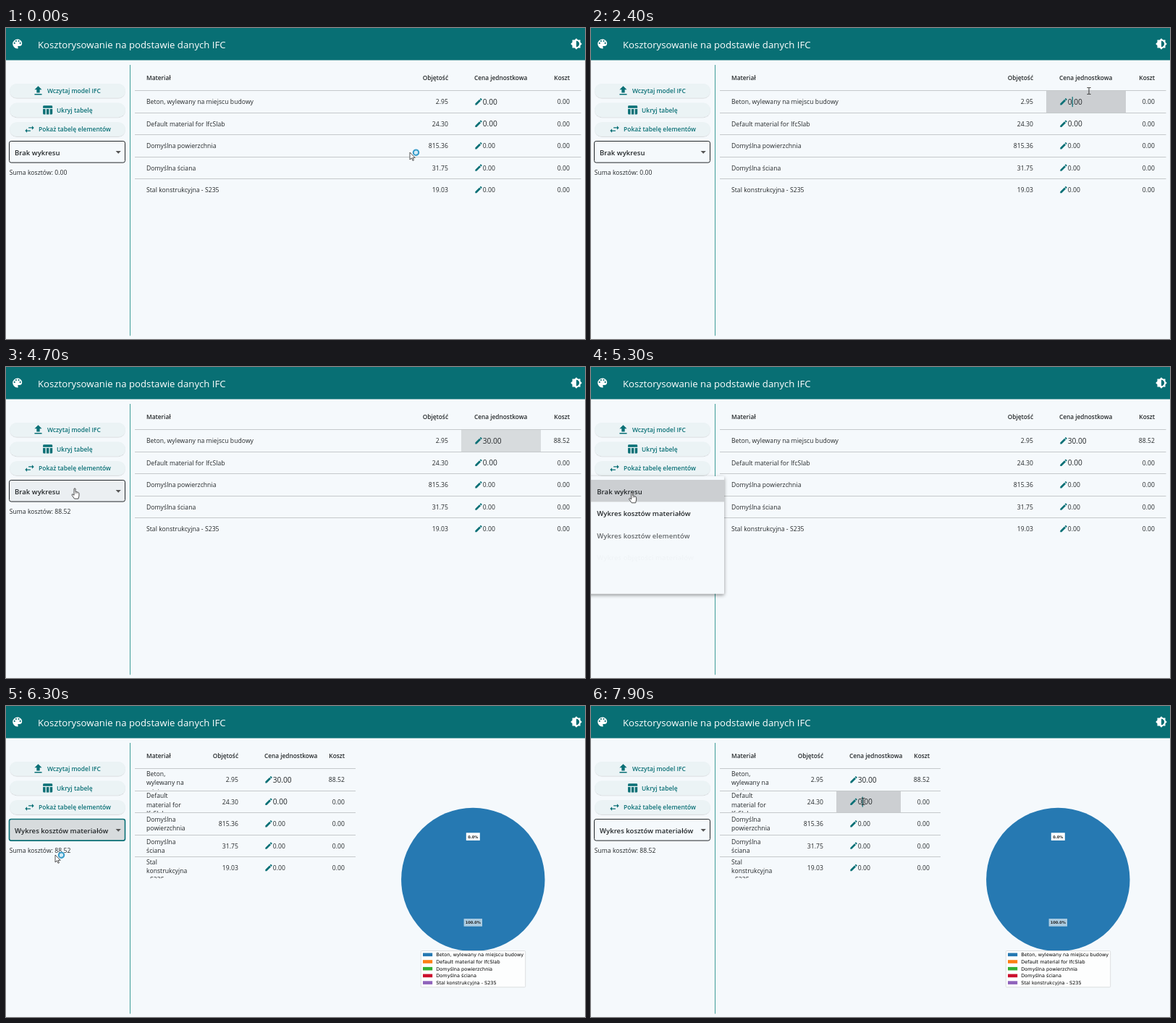
Animation of 800 by 430 pixels, one loop 8 s. Source, as an HTML page:

```html
<!DOCTYPE html>
<html lang="pl">
<head>
<meta charset="utf-8">
<style>
html, body { margin: 0; width: 100%; height: 100%; overflow: hidden; background: #f5f9fc; }
svg { display: block; width: 100vw; height: 100vh; }
text { font-family: "Open Sans", "Noto Sans", sans-serif; font-size: 8.6px; letter-spacing: .05px; fill: #24282a; white-space: pre; }
.title { font-size: 13.15px; letter-spacing: .03px; fill: #fff; }
.head { font-size: 8.3px; font-weight: 600; letter-spacing: 0; }
.big { font-size: 10.2px; letter-spacing: 0; }
.pick { font-size: 9.5px; font-weight: 600; }
.button { font-size: 8.45px; font-weight: 600; letter-spacing: .02px; fill: #0a7076; }
.legend { font-family: "DejaVu Sans", sans-serif; font-size: 6.54px; letter-spacing: 0; fill: #000; }
.share { font-family: "DejaVu Sans", sans-serif; font-size: 5.1px; letter-spacing: 0; font-weight: bold; fill: #222; }
</style>
</head>
<body>
<svg viewBox="0 0 800 430" xmlns="http://www.w3.org/2000/svg">
  <defs>
    <filter id="soft" x="-10%" y="-30%" width="120%" height="180%">
      <feDropShadow dx="0" dy=".7" stdDeviation=".7" flood-opacity=".2"/>
    </filter>
    <filter id="deep" x="-10%" y="-10%" width="120%" height="125%">
      <feDropShadow dx="0" dy="2" stdDeviation="2.6" flood-opacity=".42"/>
    </filter>
  </defs>
  <g id="frame"></g>
  <g id="scene"></g>
</svg>
<script>
const LOOP = 8000, STEP = 100, TEAL = '#0a7076', PAPER = '#f5f9fc';
const ROW_TOP = 86.7, ROW_H = 30.45;

const materials = [
  { name: 'Beton, wylewany na miejscu budowy', lines: ['Beton,', 'wylewany na', 'miejscu'], volume: 2.9507 },
  { name: 'Default material for IfcSlab', lines: ['Default', 'material for', 'IfcSlab'], volume: 24.3 },
  { name: 'Domyślna powierzchnia', lines: ['Domyślna', 'powierzchnia'], volume: 815.36 },
  { name: 'Domyślna ściana', lines: ['Domyślna', 'ściana'], volume: 31.75 },
  { name: 'Stal konstrukcyjna - S235', lines: ['Stal', 'konstrukcyjna', '- S235'], volume: 19.03 }
];
const sliceColors = ['#2679b2', '#fd7e14', '#33b033', '#cb0f2d', '#8f63bb'];
const options = ['Brak wykresu', 'Wykres kosztów materiałów', 'Wykres kosztów elementów',
  'Wykres objętości materiałów', 'Wykres objętości elementów'];

const icons = {
  palette: 'M12 3a9 9 0 0 0 0 18c.83 0 1.5-.67 1.5-1.5 0-.39-.15-.74-.39-1.01-.23-.26-.38-.61-.38-.99 0-.83.67-1.5 1.5-1.5H16a5 5 0 0 0 5-5c0-4.42-4.03-8-9-8z',
  contrast: 'M20 15.31L23.31 12 20 8.69V4h-4.69L12 .69 8.69 4H4v4.69L.69 12 4 15.31V20h4.69L12 23.31 15.31 20H20zM12 18V6a6 6 0 0 1 0 12z',
  upload: 'M9 16h6v-6h4l-7-7-7 7h4zM5 18h14v2H5z',
  table: 'M10 10h5v11h-5zM17 21h3a2 2 0 0 0 2-2v-9h-5zM20 3H5a2 2 0 0 0-2 2v3h19V5a2 2 0 0 0-2-2zM3 19a2 2 0 0 0 2 2h3V10H3z',
  swap: 'M7 11l-4 4 4 4v-3h7v-2H7zM21 9l-4-4v3h-7v2h7v3z',
  pencil: 'M3 17.25V21h3.75L17.81 9.94l-3.75-3.75zM20.71 7.04a1 1 0 0 0 0-1.41l-2.34-2.34a1 1 0 0 0-1.41 0l-1.83 1.83 3.75 3.75z'
};

// Timed states: [start, value...]; the last one begun is in force.
const mousePath = [[0, 558, 172], [400, 558, 172], [1200, 663.5, 102], [2000, 663.5, 102], [2300, 688, 87],
  [3850, 688, 87], [4850, 57, 180], [5350, 57, 180], [5650, 68, 206], [6500, 68, 206], [7200, 376, 132]];
const pointers = [[0, 'busy'], [1000, 'beam'], [4000, 'arrow'], [4570, 'hand'], [5900, 'busy'], [6700, 'arrow'], [7000, 'beam']];
const edits = [[0, '0.00', 0], [1950, '0.00', 1], [2550, '.00', 0], [2800, '3.00', 1], [3000, '30.00', 2]];
const MENU_OPEN = 5057, MENU_PICK = 5700, CHART_AT = 6150, SECOND_FOCUS = 7450;

const clamp = v => Math.min(1, Math.max(0, v));
const ramp = (v, from, to) => clamp((v - from) / (to - from));
const current = (list, t) => list.filter(item => item[0] <= t).pop();

const text = (x, y, s, cls = '', extra = '') => `<text x="${x}" y="${y}" class="${cls}" ${extra}>${s}</text>`;
const textEnd = (x, y, s, cls) => text(x, y, s, cls, 'text-anchor="end"');
const rect = (x, y, w, h, fill, extra = '') => `<rect x="${x}" y="${y}" width="${w}" height="${h}" fill="${fill}" ${extra}/>`;
const shade = (x, y, w, h, alpha) => alpha ? rect(x, y, w, h, '#000', `opacity="${alpha}"`) : '';
const icon = (name, x, y, scale, fill = TEAL) =>
  `<path d="${icons[name]}" fill="${fill}" fill-rule="evenodd" transform="translate(${x} ${y}) scale(${scale}) translate(-12 -12)"/>`;
const dot = (x, y, r, fill) => `<circle cx="${x}" cy="${y}" r="${r}" fill="${fill}"/>`;
const inside = ([px, py], x, y, w, h) => px > x && px < x + w && py > y && py < y + h;

function button(y, name, iconX, label, textX, scale) {
  return rect(5, y - 9.8, 160, 19.6, '#ebf3f5', 'rx="9.8" filter="url(#soft)"') +
    icon(name, iconX, y, scale) + text(textX, y + 3.3, label, 'button');
}

function frame() {
  const holes = [[6.5, 10.5], [9.5, 6.5], [14.5, 6.5], [17.5, 10.5]];
  return rect(0, 0, 800, 430, PAPER) + rect(0, 0, 800, 44.5, '#086f74') +
    icon('palette', 15.7, 22, .72, '#fff') +
    holes.map(([x, y]) => dot(15.7 + (x - 12) * .72, 22 + (y - 12) * .72, 1.08, '#086f74')).join('') +
    icon('contrast', 788, 22, .69, '#fff') +
    text(44, 27.7, 'Kosztorysowanie na podstawie danych IFC', 'title') +
    rect(171, 51, 1, 374.5, '#3f9c98') +
    button(86.7, 'upload', 44.5, 'Wczytaj model IFC', 57, .72) +
    button(113.4, 'table', 57.3, 'Ukryj tabelę', 70, .69) +
    button(140, 'swap', 32.5, 'Pokaż tabelę elementów', 45, .69);
}

function pointerAt(t) {
  const next = mousePath.findIndex(p => p[0] > t);
  if (next < 0) return mousePath[mousePath.length - 1].slice(1);
  const [t0, x0, y0] = mousePath[next - 1], [t1, x1, y1] = mousePath[next];
  const u = ramp(t, t0, t1), k = u * u * (3 - 2 * u);
  return [x0 + (x1 - x0) * k, y0 + (y1 - y0) * k];
}

function pointer(t) {
  const [x, y] = pointerAt(t), kind = current(pointers, t)[1];
  const arrow = '<path d="M0 0v10l2.4-2.2 1.6 3.6 1.5-.7-1.6-3.4h3.3z" fill="#fff" stroke="#111" stroke-width=".7"/>';
  const shapes = {
    arrow,
    busy: arrow + '<circle cx="8.5" cy=".2" r="3.7" fill="#d3ecf7" stroke="#3a9dca" stroke-width="2.1"/>',
    beam: '<path d="M-2.5-4.5h2l.5.5.5-.5h2M0-4v8M-2.5 4.5h2L0 4l.5.5h2" fill="none" stroke="#222" stroke-width=".9"/>',
    hand: '<path d="M-1.3-6q1-1.2 2 0v4l3.3.8q1.6.4 1.6 2v3.2l-1 3.8h-5.4L-4 3.3q-.9-1.6.5-1.9l2.2 1.5z" fill="#fff" stroke="#222" stroke-width=".8"/><path d="M1 1v-2.5M3 1v-2" stroke="#222" stroke-width=".5"/>'
  };
  return `<g transform="translate(${x} ${y})">${shapes[kind]}</g>`;
}

function table(t, narrow, edit) {
  const shift = narrow ? -290 : 0, costX = narrow ? 468 : 779, right = narrow ? 483 : 794.5;
  const cellX = 629 + shift, cellW = narrow ? 89 : 110;
  const focus = t >= SECOND_FOCUS ? 1 : t >= 1950 && t < MENU_OPEN ? 0 : -1;
  let out = text(194, 72.4, 'Materiał', 'head') + textEnd(611 + shift, 72.4, 'Objętość', 'head') +
    text(647 + shift, 72.4, 'Cena jednostkowa', 'head') + textEnd(costX, 72.4, 'Koszt', 'head');

  materials.forEach((m, i) => {
    const top = ROW_TOP + i * ROW_H, mid = top + 15.4, base = mid + 3.2;
    const hover = inside(pointerAt(t), cellX, top, cellW, ROW_H);
    out += shade(cellX, top, cellW, ROW_H, (i === focus ? .12 : 0) + (hover ? .05 : 0));
    out += rect(178, Math.round(top - .5), right - 178, 1, '#c5c9cb');
    if (narrow) {
      const first = m.lines.length === 3 ? top + 10.3 : mid - 2.9;
      out += `<svg x="178" y="${top}" width="90" height="${ROW_H - .6}" viewBox="178 ${top} 90 ${ROW_H - .6}">` +
        m.lines.map((line, n) => text(194, first + n * 12.3, line)).join('') + '</svg>';
    } else out += text(194, base, m.name);

    const price = i ? '0.00' : edit[1], cost = m.volume * parseFloat(price);
    out += textEnd(611 + shift, base, m.volume.toFixed(2)) + icon('pencil', 653 + shift, mid - .3, .52) +
      text(658.7 + shift, i < 2 ? base + .6 : base, price, i < 2 ? 'big' : '') +
      textEnd(costX, base, cost.toFixed(2));
    if (i === focus) {
      const since = i ? SECOND_FOCUS : edit[0], place = i ? 1 : edit[2];
      if ((t - since) % 1000 < 500) out += rect(658.8 + shift + place * 5.85, mid - 7, 1.2, 14, TEAL);
    }
  });
  return out;
}

function field(t) {
  const picked = t >= MENU_PICK, focused = t >= MENU_OPEN && t < SECOND_FOCUS;
  const hover = inside(pointerAt(t), 4.5, 156.5, 160, 30);
  return rect(4.5, 156.5, 160, 29.6, focused ? '#d7dbdd' : PAPER,
      `rx="2.6" stroke="${focused ? TEAL : '#24282a'}" stroke-width="${focused ? 1.6 : 1}"`) +
    shade(5, 157, 159, 29, hover ? .04 : 0) +
    text(12, 175.6, options[picked ? 1 : 0], 'pick') + '<path d="M151.6 170h7.2l-3.6 3.7z" fill="#555"/>';
}

function menu(t) {
  const closing = ramp(t, MENU_PICK, MENU_PICK + 250);
  if (t < MENU_OPEN || closing === 1) return '';
  const open = ramp(t, MENU_OPEN, MENU_OPEN + 300), grow = ramp(open, .25, .5), unit = .5 / 6.5;
  const top = 156 - 5 * grow, height = 30.5 + 132 * grow;
  const items = options.map((label, i) => {
    const start = .5 + (i + 1) * unit, y = 156 + i * ROW_H;
    const alpha = i ? ramp(open, start, start + 1.5 * unit) : 1;
    const hover = inside(pointerAt(t), 0, y, 184, ROW_H);
    return `<g opacity="${alpha}">` + shade(0, y, 184, ROW_H, (i ? 0 : .12) + (hover ? .05 : 0)) +
      text(8.3, y + 19.6, label, 'pick') + '</g>';
  }).join('');
  return `<g opacity="${ramp(open, 0, .25) * (1 - closing)}">` +
    rect(-6, top, 190, height, PAPER, 'rx="1.5" filter="url(#deep)"') + items + '</g>';
}

function chart() {
  const label = (y, w, s, alpha) => rect(645.3 - w / 2, y - 5.3, w, 10.6, '#fff', `opacity="${alpha}"`) +
    text(645.3, y + 1.9, s, 'share', 'text-anchor="middle"');
  return dot(645.3, 240, 99.2, sliceColors[0]) + label(180.6, 19, '0.0%', 1) + label(299.4, 25.4, '100.0%', .62) +
    rect(573.3, 338.5, 144.4, 50.3, '#fff', 'rx="1.3" fill-opacity=".85" stroke="#d5d7d9" stroke-width=".8"') +
    materials.map((m, i) => {
      const y = 343.8 + i * 9.7;
      return rect(576, y - 2.3, 13.2, 4.6, sliceColors[i]) + text(594.3, y + 2.3, m.name, 'legend');
    }).join('');
}

function scene(t) {
  const narrow = t >= CHART_AT, edit = current(edits, t);
  const total = materials[0].volume * parseFloat(edit[1]);
  return table(t, narrow, edit) + field(t) + text(4.7, 203.2, 'Suma kosztów: ' + total.toFixed(2)) +
    (narrow ? chart() : '') + menu(t) + pointer(t);
}

const sceneNode = document.getElementById('scene');
document.getElementById('frame').innerHTML = frame();
let shown = -1;
function tick() {
  const t = Math.floor(performance.now() % LOOP / STEP) * STEP;
  if (t !== shown) sceneNode.innerHTML = scene(shown = t);
  requestAnimationFrame(tick);
}
tick();
</script>
</body>
</html>
```
